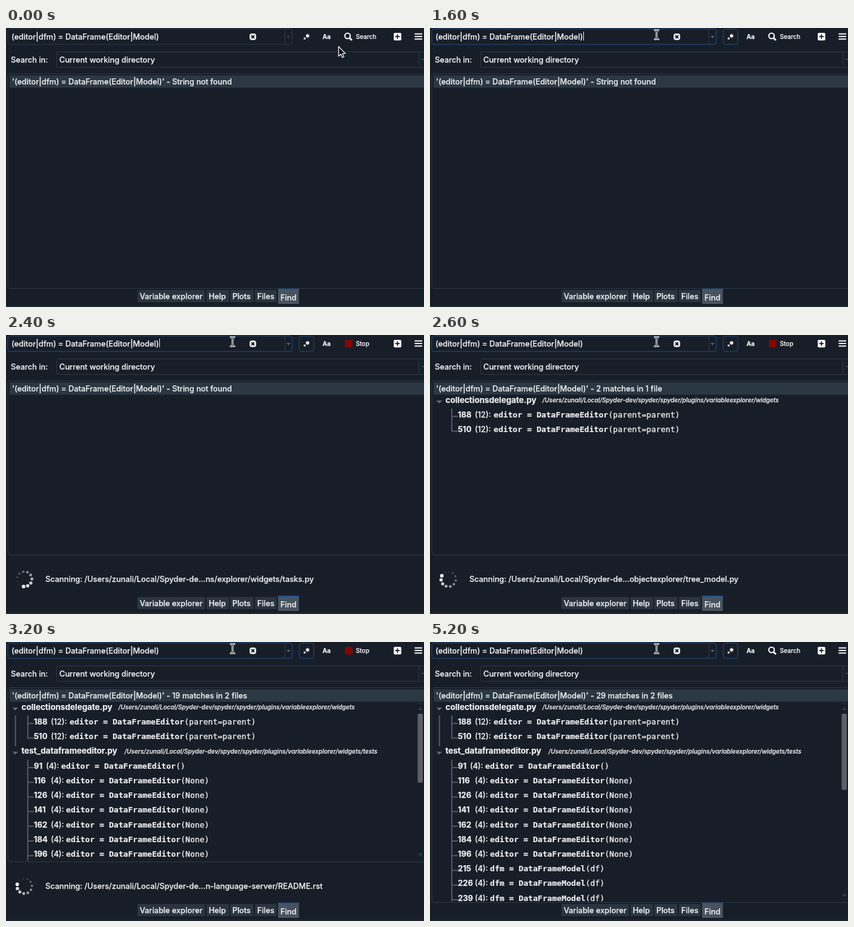
Write an HTML page that moves like this. It is 690 px wide and 460 px high and loops after 5600 ms.

```html
<!DOCTYPE html>
<html lang="en">
<head>
<meta charset="utf-8">
<title>Find panel</title>
<style>
  html, body { margin: 0; width: 100%; height: 100%; overflow: hidden; background: #181e28; }
  svg { display: block; }
  text { font: 500 12.8px Inter, "Open Sans", sans-serif; fill: #eceef0; stroke: #eceef0; stroke-width: .25; }
  .small { font-size: 10.1px; }
  .bold { font-weight: 700; font-size: 13px; }
  .file { font-size: 13.45px; }
  .path { font-size: 10.1px; font-style: italic; }
  .code { font: 400 13.1px "DejaVu Sans Mono", monospace; stroke-width: .35; }
  .code tspan { font-weight: 700; stroke-width: .2; }
  .frame { fill: none; stroke: #2c3945; }
  .focus { stroke: #1f4d82; }
  .branch { fill: none; stroke: #505a64; stroke-width: 2; }
  .tab { fill: #2a3540; }
</style>
</head>
<body>
<svg width="690" height="460" viewBox="0 0 690 460">
  <defs>
    <clipPath id="clip"><rect id="clipBox" x="4" y="77" width="686" height="351"/></clipPath>
  </defs>
  <rect width="690" height="460" fill="#181e28"/>

  <!-- search bar -->
  <rect id="edit" class="frame" x="3" y="1.5" width="469.5" height="25.5" rx="3.5"/>
  <path d="M460.5 2V27" class="frame"/>
  <path id="drop" d="M463 13h6.5l-3.25 4z" fill="#2f3c47"/>
  <text x="9" y="18.5">(editor|dfm) = DataFrame(Editor|Model)</text>
  <path id="caret" d="M253.5 6V20.5" stroke="#eceef0"/>
  <rect x="402" y="9" width="11" height="11" rx="4" fill="#e4e6e8"/>
  <path d="M405.2 12.2l4.6 4.6m0-4.6l-4.6 4.6" stroke="#181e28" stroke-width="2"/>
  <rect id="regex" class="frame focus" x="484" y="2" width="24" height="25" rx="3.5"/>
  <rect x="491.5" y="15.8" width="3" height="3" fill="#f4f5f6"/>
  <path d="M497.8 9.8v6.4M495.1 11.4l5.4 3.2m0-3.2l-5.4 3.2" stroke="#f4f5f6" stroke-width="1.7"/>
  <text x="522.5" y="18" class="small" style="font-weight:700">Aa</text>
  <g id="search">
    <circle cx="563.8" cy="13" r="4.5" fill="none" stroke="#f4f5f6" stroke-width="2.2"/>
    <path d="M567 16.3l4 4" stroke="#f4f5f6" stroke-width="2.8"/>
    <text x="577.5" y="18" class="small">Search</text>
  </g>
  <g id="stop">
    <rect x="559.5" y="8" width="12.5" height="12.5" fill="#820805"/>
    <text x="577.5" y="18" class="small">Stop</text>
  </g>
  <rect x="640" y="8" width="12.5" height="12.5" rx="1.8" fill="#f4f5f6"/>
  <path d="M646.2 10.6v7.2M642.6 14.2h7.2" stroke="#181e28" stroke-width="1.8"/>
  <path d="M674.5 9.7h12.5m-12.5 4.3h12.5m-12.5 4.3h12.5" stroke="#f4f5f6" stroke-width="2"/>

  <text x="8" y="56.5">Search in:</text>
  <rect class="frame" x="83.5" y="39.5" width="620" height="25.5" rx="3.5"/>
  <path d="M681.5 40V65" class="frame"/>
  <path d="M685 50.5h6.5l-3.25 4z" fill="#2f3c47"/>
  <text x="88" y="56.5">Current working directory</text>

  <!-- results -->
  <rect id="tree" class="frame" x="3" y="75.5" width="700" height="354" rx="4"/>
  <rect x="6" y="78" width="684" height="20.5" fill="#2b3742"/>
  <text x="10" y="93">'(editor|dfm) = DataFrame(Editor|Model)' - <tspan id="count"></tspan></text>
  <g clip-path="url(#clip)">
    <g id="first"></g>
    <g id="second"></g>
  </g>
  <g id="scroll">
    <rect x="678" y="101" width="11" height="1" fill="#222b36"/>
    <path d="M680 112h8l-4-5z" fill="#2f3c47"/>
    <path id="down" d="M680 0h8l-4 5z" fill="#2f3c47"/>
    <rect id="thumb" x="679.5" y="118" width="8.5" rx="3" fill="#5b6067"/>
  </g>

  <!-- progress -->
  <g id="progress">
    <g id="spinner" fill="#f6f7f8"></g>
    <text x="65" y="406.5">Scanning: /Users/zunali/Local/Spyder-de...<tspan id="tail"></tspan></text>
  </g>

  <g id="tabs"></g>
  <rect x="449" y="430" width="34.5" height="25" fill="#48535e"/>
  <rect x="449" y="429.8" width="34.5" height="2" fill="#1d5796"/>
  <text x="453" y="448.7">Find</text>
  <path d="M0 458.5H690" stroke="#29333e"/>

  <path id="arrow" d="M0 0V16L3.7 12.6L6.1 18.2L8.8 17L6.4 11.6H11.2Z" fill="#0c1016" stroke="#f4f5f6" stroke-width="1.3" stroke-linejoin="round"/>
  <g id="beam" fill="none" stroke-linecap="round">
    <path d="M-3-7.5Q0-7.5 0-5Q0-7.5 3-7.5M0-5V5M-3 7.5Q0 7.5 0 5Q0 7.5 3 7.5" stroke="#f4f5f6" stroke-width="3"/>
    <path d="M-3-7.5Q0-7.5 0-5Q0-7.5 3-7.5M0-5V5M-3 7.5Q0 7.5 0 5Q0 7.5 3 7.5" stroke="#10151d" stroke-width=".9"/>
  </g>
</svg>

<script>
const $ = id => document.getElementById(id);
const show = (id, on) => $(id).style.display = on ? "" : "none";
const LOOP = 5600, STEP = 200, PITCH = 24.23;
const ROOT = "/Users/zunali/Local/Spyder-dev/spyder/spyder/plugins/variableexplorer/widgets";

const rowY = i => 107 + i * PITCH;

function fileRow(i, name, path, x) {
  const y = rowY(i);
  return `<path d="M10.5 ${y + 1}h9.5l-4.75 5z" fill="#606a75"/>
    <text class="bold file" x="25.5" y="${y + 4.5}">${name}</text>
    <text class="path" x="${x}" y="${y + 4.2}">${path}</text>`;
}

function matchRow(i, line, col, match, rest) {
  const y = rowY(i), colX = line > 99 ? 74 : 66;
  const codeX = colX + (col > 9 ? 31 : 25);
  return `<path class="branch" d="M36 ${y - 10}V${y + 3}H46"/>
    <text class="bold" x="46" y="${y + 4.7}">${line}</text>
    <text x="${colX}" y="${y + 4.7}">(${col}):</text>
    <text class="code" x="${codeX}" y="${y + 4.7}"><tspan>${match}</tspan>${rest}</text>`;
}

const editor = "editor = DataFrameEditor", model = "dfm = DataFrameModel";
$("first").innerHTML = fileRow(0, "collectionsdelegate.py", ROOT, 185.5) +
  [188, 510].map((n, i) => matchRow(i + 1, n, 12, editor, "(parent=parent)")).join("") +
  `<path class="branch" d="M36 ${rowY(1)}V${rowY(2)}"/>`;

const lines = [91, 116, 126, 141, 162, 184, 196, 215, 226, 239];
$("second").innerHTML = `<path class="branch" d="M15.5 121V172"/>` +
  fileRow(3, "test_dataframeeditor.py", ROOT + "/tests", 195.5) +
  `<path class="branch" d="M36 ${rowY(4)}V428"/>` +
  lines.map((n, i) => i < 7
    ? matchRow(i + 4, n, 4, editor, i ? "(None)" : "()")
    : matchRow(i + 4, n, 4, model, "(df)")).join("");

$("tabs").innerHTML = [["Variable explorer", 217, 111.5], ["Help", 331, 37], ["Plots", 370, 38.5], ["Files", 411, 35.5]]
  .map(([label, x, w]) => `<rect class="tab" x="${x}" y="432" width="${w}" height="20"/>
    <text x="${x + 3.7}" y="446.8">${label}</text>`).join("");

// pointer position by step; from step 5 on it is a text beam
const pointer = [[549, 30.5], [515, 19], [498.5, 6.5], [501, 8], [501, 8], [436, 19], [377, 17], [374, 11]];

const tails = [
  "pyder/images/spyder-icon.svg",
  "g_src/spyder-title-horiz.svg",
  "/plugins/editor/api/panel.py",
  "ns/explorer/widgets/tasks.py",
  "objectexplorer/tree_model.py",
  "ns/variableexplorer/utils.py",
  "external-deps/qtpy/compat.py",
  "n-language-server/README.rst",
  "on-language-server/setup.cfg"
];
const heads = [77, 190, 74, 187, 297, 53, 166, 284, 32];

function drawSpinner(head) {
  let dots = "";
  for (let i = 0; i < 11; i++) {
    const a = (head - i * 360 / 11) * Math.PI / 180, k = Math.max(0, 1 - i / 9);
    dots += `<circle cx="${30.5 + 12.3 * Math.sin(a)}" cy="${402.5 - 12.3 * Math.cos(a)}"
      r="${1.5 + 1.4 * k}" opacity="${0.08 + 0.92 * k}"/>`;
  }
  $("spinner").innerHTML = dots;
}

function draw(s) {
  const scanning = s >= 9 && s < 18;
  const [x, y] = pointer[Math.min(s, 7)];
  const kind = s < 5 ? "arrow" : "beam";
  show("arrow", s < 5);
  show("beam", s >= 5);
  $(kind).setAttribute("transform", `translate(${x} ${y})`);

  show("regex", s >= 3);
  $("edit").classList.toggle("focus", s >= 7);
  $("drop").setAttribute("fill", s >= 7 ? "#56616c" : "#2f3c47");
  show("caret", (s >= 7 && s < 13) || s === 15 || (s >= 21 && s < 26));
  show("search", !scanning);
  show("stop", scanning);
  show("progress", scanning);

  const bottom = scanning ? 362.5 : 429.5;
  $("tree").setAttribute("height", bottom - 75.5);
  $("clipBox").setAttribute("height", bottom - 79);
  $("count").textContent = s < 13 ? "String not found"
    : s < 14 ? "2 matches in 1 file"
    : s < 18 ? "19 matches in 2 files" : "29 matches in 2 files";
  show("first", s >= 13);
  show("second", s >= 14);
  show("scroll", s >= 14);
  $("thumb").setAttribute("height", scanning ? 114 : 126);
  $("down").setAttribute("transform", `translate(0 ${bottom - 14})`);

  if (scanning) {
    $("tail").textContent = tails[s - 9];
    drawSpinner(heads[s - 9]);
  }
}

const start = performance.now();
let last = -1;
function tick() {
  const s = Math.floor((performance.now() - start) % LOOP / STEP);
  if (s !== last) draw(last = s);
  requestAnimationFrame(tick);
}
tick();
</script>
</body>
</html>
```
